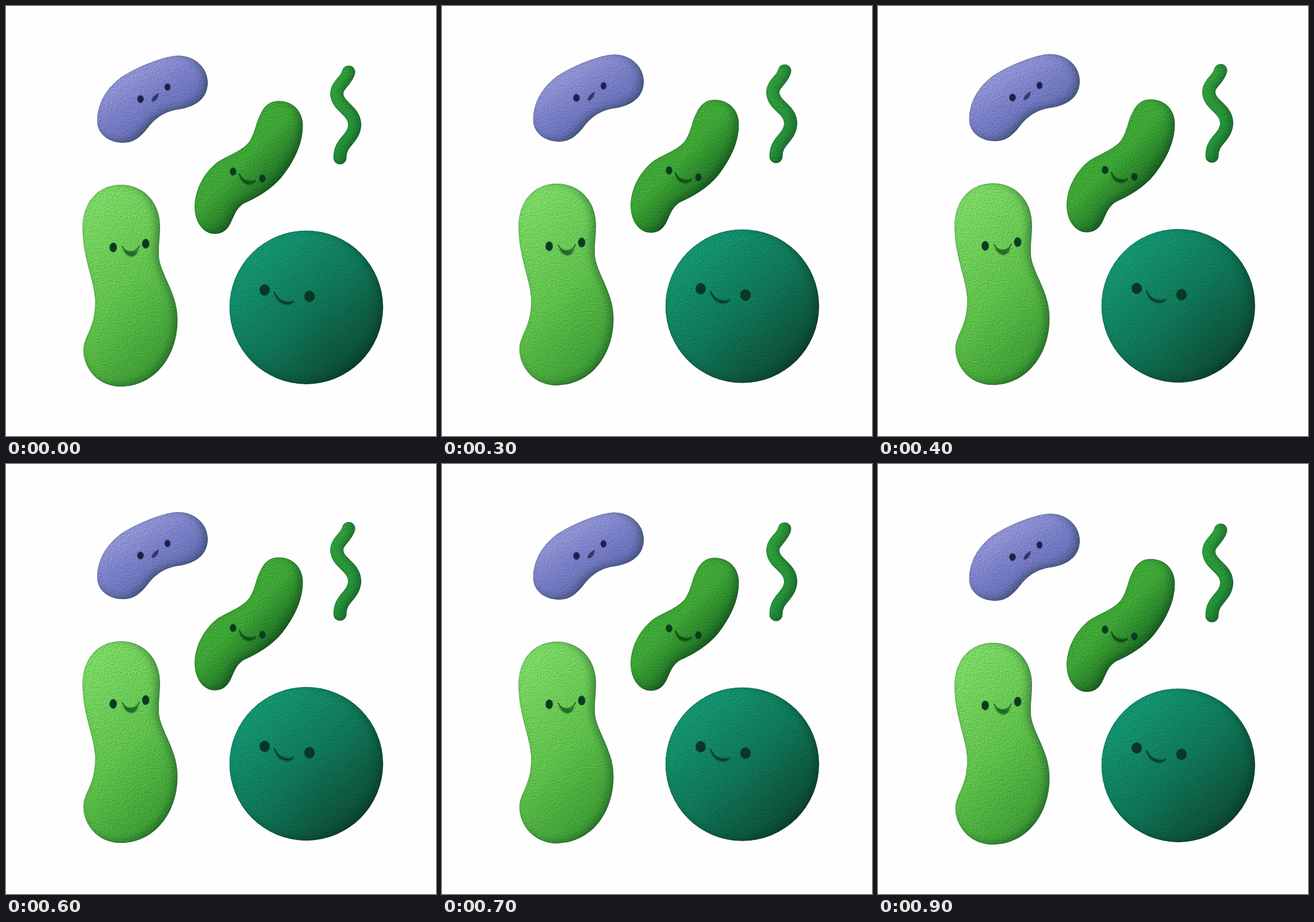
These frames come from a looping animation (748x748 px, 1 s). An HTML page:

```html
<!DOCTYPE html>
<html lang="en">
<head>
<meta charset="utf-8">
<title>Floating microbes</title>
<style>
  html, body { margin: 0; width: 100%; height: 100%; overflow: hidden; background: #fefefe; }
  svg { display: block; width: 100%; height: 100%; }
  .lip { fill: none; stroke-linecap: round; stroke-width: 1.8; }
</style>
</head>
<body>
<svg viewBox="0 0 748 748">
  <defs>
    <linearGradient id="violet" x1=".2" y1=".15" x2=".75" y2=".85">
      <stop offset="0" stop-color="#9a9dda"/><stop offset=".45" stop-color="#797fc6"/><stop offset="1" stop-color="#5d64ad"/>
    </linearGradient>
    <linearGradient id="leaf" x1=".32" y1=".2" x2=".72" y2=".68">
      <stop offset="0" stop-color="#41a937"/><stop offset=".45" stop-color="#3da535"/><stop offset="1" stop-color="#1d6c22"/>
    </linearGradient>
    <linearGradient id="lime" x1=".3" y1="0" x2=".75" y2="1">
      <stop offset="0" stop-color="#7bd765"/><stop offset=".5" stop-color="#5fc04b"/><stop offset="1" stop-color="#379630"/>
    </linearGradient>
    <linearGradient id="teal" x1=".2" y1=".12" x2=".85" y2=".85">
      <stop offset="0" stop-color="#149470"/><stop offset=".5" stop-color="#0f7657"/><stop offset="1" stop-color="#0d4a36"/>
    </linearGradient>
    <linearGradient id="grass" x1="0" y1="0" x2=".3" y2="1">
      <stop offset="0" stop-color="#32a33b"/><stop offset="1" stop-color="#25923a"/>
    </linearGradient>
    <!-- Fine clay grain, a soft shade on the right and a faint dark rim -->
    <filter id="clay" filterUnits="userSpaceOnUse" x="120" y="70" width="550" height="610" color-interpolation-filters="sRGB">
      <feTurbulence type="fractalNoise" baseFrequency=".36" numOctaves="2" seed="4"/>
      <feDiffuseLighting surfaceScale=".55" diffuseConstant="1" lighting-color="#fff" result="light">
        <feDistantLight azimuth="235" elevation="60"/>
      </feDiffuseLighting>
      <feComposite in="SourceGraphic" in2="light" operator="arithmetic" k1="1.16"/>
      <feComposite in2="SourceAlpha" operator="in" result="grain"/>
      <feGaussianBlur in="SourceAlpha" stdDeviation="7"/>
      <feOffset dx="-7" dy="-3" result="inner"/>
      <feFlood flood-color="#03251a" flood-opacity=".38"/>
      <feComposite in2="inner" operator="out"/>
      <feComposite in2="SourceAlpha" operator="in" result="shade"/>
      <feMorphology in="SourceAlpha" radius="1" result="core"/>
      <feFlood flood-color="#03251a" flood-opacity=".1"/>
      <feComposite in2="core" operator="out"/>
      <feComposite in2="SourceAlpha" operator="in" result="rim"/>
      <feMerge>
        <feMergeNode in="grain"/><feMergeNode in="shade"/><feMergeNode in="rim"/>
      </feMerge>
    </filter>
    <filter id="soft" x="-50%" y="-50%" width="200%" height="200%"><feGaussianBlur stdDeviation="1.2"/></filter>
  </defs>

  <g id="microbes">
    <g filter="url(#clay)">
      <path fill="url(#violet)" d="M158.5 200C158.5 172 172 145 200 124C224 108 262 92 290 87C326 82 351 107 351 133C351 158 334 173 306 179C280 182 264 191 249 209C238 223 226 238 204 238C178 238 158.5 222 158.5 200Z"/>
      <path fill="url(#leaf)" d="M474 165C500 165 516.5 184 516.5 208C516.5 240 501 270 481 296C463 318 438 333 415 343C402 350 398 362 392 375C386 389 377 396.5 363 396.5C342 396.5 328 374 328 350C328 318 346 287 370 270C390 258 412 251 423 236C434 219 434 203 443 187C449 174 459 165 474 165Z"/>
      <path fill="url(#lime)" d="M200 311C241 311 268 343 268 384C268 408 263 428 268 447C276 476 298.5 505 298.5 546C298.5 610 258 662 199 662C160 662 134.5 630 134.5 599C134.5 575 155 561 155 515C155 480 133 440 133 386C133 341 160 311 200 311Z"/>
      <circle fill="url(#teal)" cx="522.3" cy="524.2" r="133.7"/>
      <path fill="none" stroke="url(#grass)" stroke-width="23" stroke-linecap="round" d="M596 115C592 131 575 137 575.5 153C576 175 606 181 606.5 206C606 232 580 236 581 264"/>
    </g>

    <g fill="#1d2145" stroke="#3f4380">
      <ellipse cx="234" cy="162" rx="5.5" ry="6.5"/><ellipse cx="281" cy="141" rx="5" ry="6.2"/>
    </g>
    <path fill="#34386f" d="M253 165Q255 156 266 151Q265 161 259 165Q256 168 253 165Z"/>

    <g fill="#0a3a22" stroke="#145621">
      <ellipse cx="395" cy="288" rx="5.4" ry="6.7"/><ellipse cx="446" cy="300" rx="5.4" ry="6.7"/>
    </g>
    <path fill="#17591c" filter="url(#soft)" d="M405 292Q409 311 424 311Q432 310 435 304Q412 306 405 292Z"/>
    <path class="lip" stroke="#0e4216" d="M406 292Q411 306 422 307Q431 307 434 303"/>

    <g fill="#0d3822" stroke="#226d2b">
      <ellipse cx="186.5" cy="420" rx="6.2" ry="8.2"/><ellipse cx="243" cy="413.5" rx="6.2" ry="8.2"/>
    </g>
    <path fill="#22682a" filter="url(#soft)" d="M203 423Q209 436 219 436Q228 434 230 424Q219 433 203 423Z"/>
    <path class="lip" stroke="#1b5c23" d="M202 418Q207 428 217 428Q229 427 232 417"/>

    <g fill="#0a3626" stroke="#0a4733">
      <ellipse cx="450" cy="494" rx="8.7" ry="9.5"/><ellipse cx="528" cy="505" rx="9" ry="9.6"/>
    </g>
    <path fill="#094431" filter="url(#soft)" d="M466 498Q472 519 489 520Q498 519 500 514Q476 517 466 498Z"/>
    <path class="lip" stroke="#083626" d="M467 498Q474 515 488 517Q496 517 500 513"/>
  </g>
</svg>
<script>
  const microbes = document.getElementById('microbes');
  const LOOP = 1000, STEP = 100, RISE = 0.69;

  // Ten held steps: rest, climb to the middle of the loop, sink back.
  function draw(now) {
    const step = Math.floor(now % LOOP / STEP);
    const level = Math.min(step, 10 - step);
    const lift = level < 2 ? 0 : level * RISE;
    microbes.setAttribute('transform', `translate(0 ${-lift})`);
  }

  const start = performance.now();
  function tick() {
    draw(performance.now() - start);
    requestAnimationFrame(tick);
  }
  tick();
</script>
</body>
</html>
```
